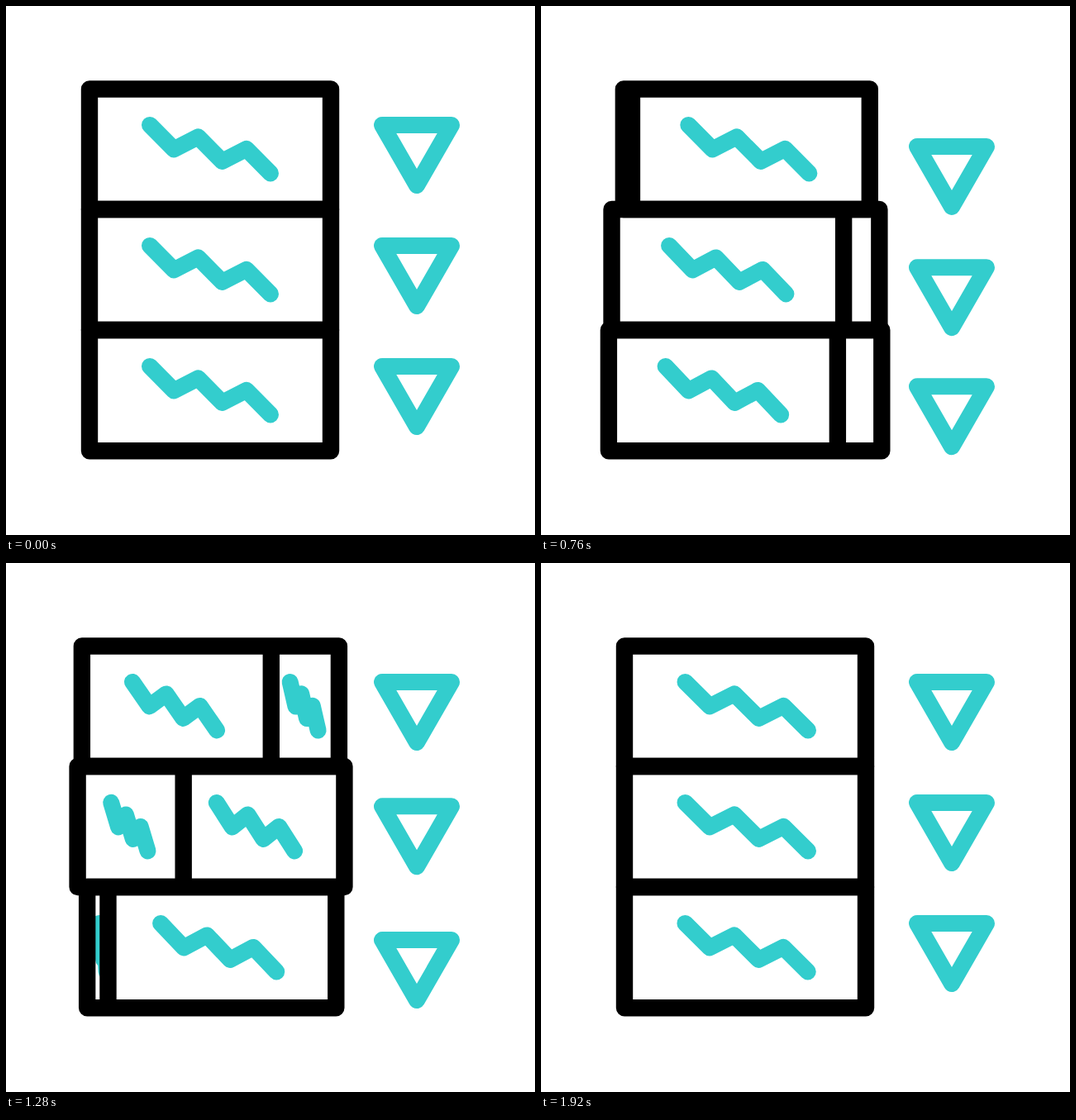
An HTML page for the animation above (2400 ms loop, 640 px wide and 640 px high).

```html
<!DOCTYPE html>
<html lang="en">
<head>
<meta charset="utf-8">
<title>Turning boxes</title>
<style>
  html, body { margin: 0; width: 100%; height: 100%; overflow: hidden; background: #fff; }
  svg { display: block; width: 100vw; height: 100vh; }
  path { fill: none; stroke-width: 20; stroke-linecap: round; stroke-linejoin: round; }
  .edge { stroke: #000; stroke-width: 20.4; }
  .mark { stroke: #33cdcd; }
</style>
</head>
<body>
<svg id="stage" viewBox="0 0 640 640"></svg>
<script>
const LOOP = 2400, STEP = 20, END = 1920;
const BOX_DELAY = 700 / 3, ARROW_DELAY = 200, MARK_LAG = 9;
const ROW_LINES = [100.5, 246, 392, 538.3];

// edges: left, middle, right; marks: start and end x on the left and right face
const REST  = { edges: [101, 393, 393],       marks: [174, 320, 420, 420] };
const LEAN  = { edges: [81.8, 358.7, 412.4],  marks: [150.5, 290, 440, 440] };
const FRONT = { edges: [101, 396.8, 396.8],   marks: [174, 323, 420, 420] };
const START = { edges: [101, 101, 396.8],     marks: [110, 112, 174, 323] };
const HALF  = { edges: [82.5, 247, 413],      marks: [133.4, 193, 284, 358.5] };
const DONE  = { edges: [101, 393, 393],       marks: [174.5, 323, 409, 398.5] };

const stage = document.getElementById("stage");
const clamp = x => Math.min(1, Math.max(0, x));
const span = (t, from, to) => clamp((t - from) / (to - from));
const smooth = x => x * x * (3 - 2 * x);
const mix = (a, b, p) => a.map((v, i) => v + (b[i] - v) * p);

function add(parent, tag, attrs = {}) {
  const el = document.createElementNS("http://www.w3.org/2000/svg", tag);
  for (const key in attrs) el.setAttribute(key, attrs[key]);
  return parent.appendChild(el);
}

function makeFace(id, y, height) {
  const clip = add(add(stage, "clipPath", { id }), "rect", { y, height });
  const group = add(stage, "g", { "clip-path": `url(#${id})` });
  return { clip, mark: add(group, "path", { class: "mark" }) };
}

const rows = [0, 1, 2].map(i => {
  const top = ROW_LINES[i], bottom = ROW_LINES[i + 1];
  return {
    top, bottom,
    faces: ["left", "right"].map(side => makeFace(side + i, top, bottom - top)),
    frame: add(stage, "path", { class: "edge" }),
    arrow: add(stage, "path", { class: "mark", d: `M455 ${144 + 146 * i}h84l-42 73z` })
  };
});

function boxPose(t) {
  const blend = (a, b, p, q = p) => ({
    edges: mix(a.edges, b.edges, p),
    marks: mix(a.marks, b.marks, q)
  });
  if (t < 333) return blend(REST, LEAN, 1 - (1 - span(t, 0, 333)) ** 2.5);
  if (t < 700) return blend(LEAN, FRONT, span(t, 333, 667) ** 3);

  const late = t - MARK_LAG;
  const firstHalf = late < 1112;
  const markFrom = firstHalf ? START : HALF, markTo = firstHalf ? HALF : DONE;
  const q = firstHalf ? span(late, 700, 1112) ** 1.55 : span(late, 1112, 1445);
  const marks = mix(markFrom.marks, markTo.marks, q);
  if (t < 1112) {
    return { edges: mix(START.edges, HALF.edges, span(t, 700, 1112) ** 1.45), marks };
  }
  const s = span(t, 1112, 1445);
  return { edges: mix(HALF.edges, DONE.edges, 0.6 * s + 0.4 * smooth(s)), marks };
}

function zigzag(x0, x1, y) {
  const rises = [0, 29.5, 14.5, 44, 29, 58.5];
  return "M" + rises.map((dy, k) => `${x0 + (x1 - x0) * k / 5} ${y + dy}`).join("L");
}

function arrowDrop(t) {
  return 26.2 * (smooth(span(t, 0, 433)) - smooth(span(t, 733, 1200)));
}

function draw(t) {
  rows.forEach((row, i) => {
    const { edges, marks } = boxPose(t - BOX_DELAY * i);
    const [left, middle, right] = edges;
    row.faces.forEach((face, k) => {
      face.clip.setAttribute("x", edges[k]);
      face.clip.setAttribute("width", Math.max(0, edges[k + 1] - edges[k]));
      face.mark.setAttribute("d", zigzag(marks[2 * k], marks[2 * k + 1], 143.9 + 146 * i));
    });
    row.frame.setAttribute("d",
      `M${left} ${row.top}H${right}V${row.bottom}H${left}ZM${middle} ${row.top}V${row.bottom}`);
    row.arrow.setAttribute("transform", `translate(0 ${arrowDrop(t - ARROW_DELAY * i)})`);
  });
}

const begin = performance.now();
function tick() {
  const t = (performance.now() - begin) % LOOP;
  draw(Math.min(END, Math.floor(t / STEP) * STEP));
  requestAnimationFrame(tick);
}
tick();
</script>
</body>
</html>
```
